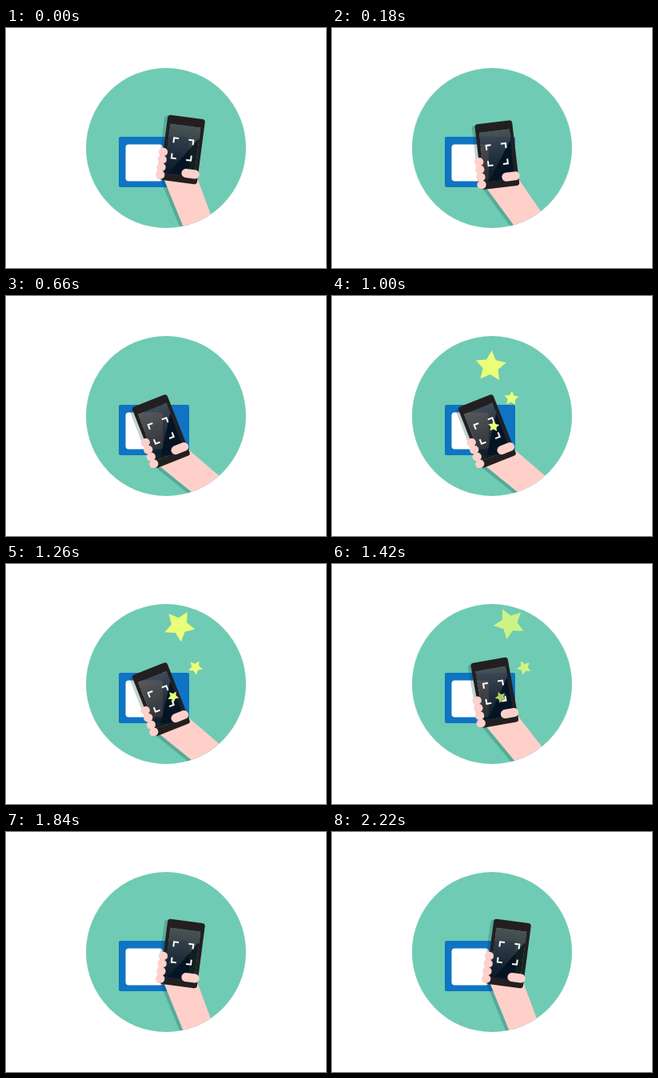
An HTML page with a canvas for the animation above (2.4 s loop, 400 by 300 pixels).

```html
<!DOCTYPE html>
<html lang="en">
<head>
<meta charset="utf-8">
<title>Scan and collect</title>
<style>
html, body { margin: 0; width: 100%; height: 100%; overflow: hidden; background: #fff; }
canvas { display: block; width: 400px; height: 300px; }
</style>
</head>
<body>
<canvas id="stage" width="400" height="300"></canvas>
<script>
const ctx = document.getElementById('stage').getContext('2d');
const LOOP = 2400;
const RAD = Math.PI / 180;
const SKIN = '#ffd0ca';
const SHADE = 'rgba(0, 70, 62, 0.24)';
const PIVOT = { x: 240, y: 212 };
const PHONE = { x: 220.5, y: 152, tilt: 7.5, w: 47, h: 82 };
const SOURCE = { x: 193, y: 166 };

// Each star pops out to (x, y), then drifts on by (dx, dy)
const STARS = [
  { r: 20, x: 184.5, y: 96, dx: 43, dy: -25 },
  { r: 9.3, x: 215, y: 127, dx: 29, dy: 3 },
  { r: 7.3, x: 197, y: 160.5, dx: 16, dy: 7 }
];

const clamp = v => Math.max(0, Math.min(1, v));
const mix = (a, b, u) => a + (b - a) * u;
const easeOut = (u, power) => 1 - Math.pow(1 - clamp(u), power);

function box(x, y, w, h, r, fill) {
  ctx.fillStyle = fill;
  ctx.beginPath();
  ctx.roundRect(x, y, w, h, r);
  ctx.fill();
}

function pill(x, y, w, h) {
  box(x - w / 2, y - h / 2, w, h, h / 2, SKIN);
}

function poly(points, fill) {
  ctx.fillStyle = fill;
  ctx.beginPath();
  points.forEach(([x, y]) => ctx.lineTo(x, y));
  ctx.closePath();
  ctx.fill();
}

function placed(x, y, deg, draw) {
  ctx.save();
  ctx.translate(x, y);
  ctx.rotate(deg * RAD);
  draw();
  ctx.restore();
}

function arm(fill) {
  poly([[197, 188], [239.5, 189], [273, 279], [234, 279]], fill);
}

function corner(x, y, sx, sy) {
  ctx.beginPath();
  ctx.moveTo(x - sx * 6, y);
  ctx.lineTo(x, y);
  ctx.lineTo(x, y - sy * 6);
  ctx.stroke();
}

function phone() {
  const { w, h } = PHONE;
  const sx = w / 2 - 4.5, top = 11 - h / 2, bottom = h / 2 - 9;

  ctx.fillStyle = '#231f20';
  ctx.beginPath();
  ctx.roundRect(-w / 2, -h / 2, w, h, 3.5);
  ctx.rect(-sx, top, 2 * sx, bottom - top);
  ctx.fill('evenodd');

  // Dark see-through glass with a fading shine
  box(-sx, top, 2 * sx, bottom - top, 0, 'rgba(4, 7, 13, 0.88)');
  const shine = ctx.createLinearGradient(0, top, 0, bottom);
  shine.addColorStop(0, 'rgba(255, 255, 255, 0.23)');
  shine.addColorStop(1, 'rgba(255, 255, 255, 0.02)');
  poly([[-sx, top], [sx, top], [sx, top + 13], [-sx + 5, bottom], [-sx, bottom]], shine);

  ctx.strokeStyle = '#fff';
  ctx.lineWidth = 2;
  for (const i of [-1, 1]) {
    for (const j of [-1, 1]) corner(i * 12.2, j * 12.7 - 0.5, i, j);
  }

  for (let i = 0; i < 4; i++) pill(-23.5, 6 + i * 9.6, 11.4, 10.4);
  pill(13.9, 28.7, 22.5, 11);
}

function hand(turn) {
  placed(PIVOT.x, PIVOT.y, turn, () => {
    ctx.translate(-PIVOT.x, -PIVOT.y);
    placed(-4, 1.5, 0, () => arm(SHADE));
    placed(PHONE.x - 4, PHONE.y + 1, PHONE.tilt, () =>
      box(-PHONE.w / 2, -PHONE.h / 2, 8, PHONE.h - 2, 3, SHADE));
    arm(SKIN);
    placed(PHONE.x, PHONE.y, PHONE.tilt, phone);
  });
}

function star({ r, x, y, dx, dy }, t) {
  const pop = easeOut((t - 680) / 300, 3);
  const drift = 1 - Math.exp(-Math.max(0, t - 900) / 260);
  const px = mix(SOURCE.x, x, pop) + dx * drift;
  const py = mix(SOURCE.y, y, pop) + dy * drift;
  placed(px, py, 4 + (t - 1000) * 0.1, () => {
    const points = [];
    for (let i = 0; i < 10; i++) {
      const a = i * Math.PI / 5, d = pop * r * (i % 2 ? 0.5 : 1);
      points.push([d * Math.sin(a), -d * Math.cos(a)]);
    }
    poly(points, '#eaff78');
  });
}

function render(t) {
  ctx.fillStyle = '#fff';
  ctx.fillRect(0, 0, 400, 300);

  ctx.save();
  ctx.beginPath();
  ctx.arc(200, 150, 100, 0, Math.PI * 2);
  ctx.fillStyle = '#70cbb4';
  ctx.fill();
  ctx.clip();
  box(141, 136, 88, 63, 2, '#0f74c3');
  box(149.5, 145.5, 46.5, 46, 4, '#fff');
  const lean = easeOut((t - 100) / 640, 5) - easeOut((t - 1360) / 640, 5);
  hand(-29 * lean);
  ctx.restore();

  if (t > 680) {
    ctx.globalAlpha = 1 - clamp((t - 1320) / 420);
    STARS.forEach(s => star(s, t));
    ctx.globalAlpha = 1;
  }
}

const start = performance.now();
function tick() {
  render((performance.now() - start) % LOOP);
  requestAnimationFrame(tick);
}
tick();
</script>
</body>
</html>
```
